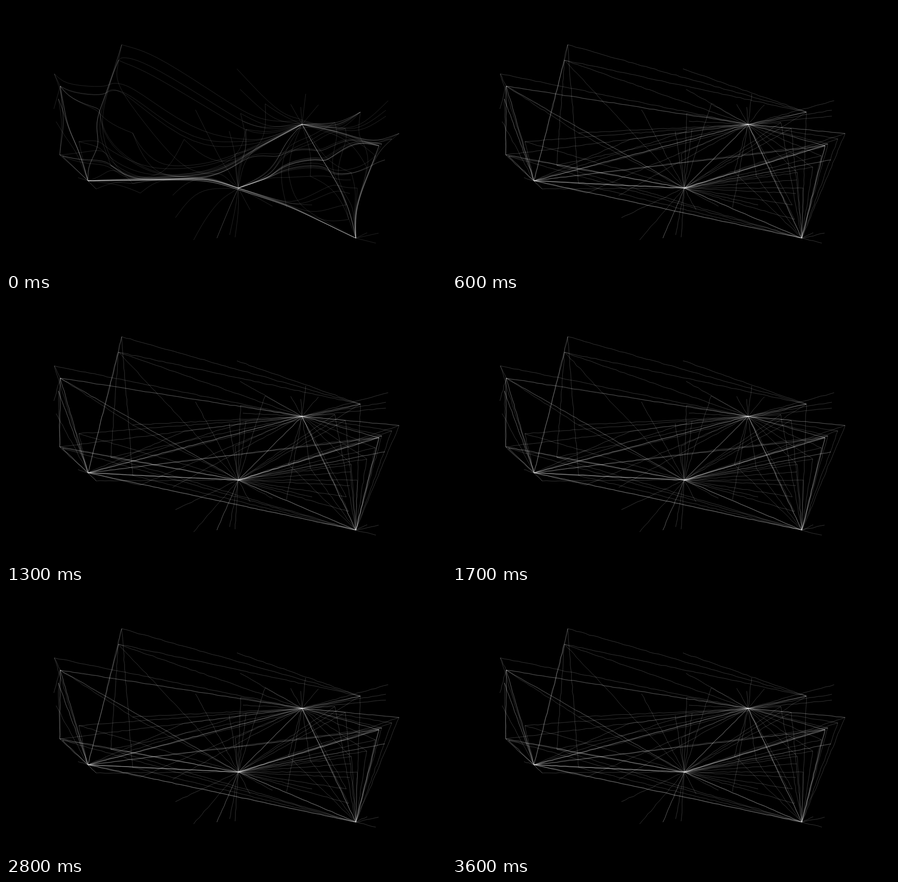
Recreate the animation shown at these times as an HTML page with a canvas. Size 966x580 px, loop 3.7 s.

```html
<!DOCTYPE html>
<html lang="en">
<head>
<meta charset="utf-8">
<title>Edge bundling</title>
<style>
  html, body { margin: 0; width: 100%; height: 100%; overflow: hidden; background: #000; }
  canvas { display: block; }
</style>
</head>
<body>
<canvas id="stage" width="966" height="580"></canvas>
<script>
const ctx = document.getElementById('stage').getContext('2d');
const STEP = 100, STEPS = 37, SPACING = 10;

const hubs = {
  C: [650, 260], D: [510, 400], M: [768, 510], L: [180, 384], T: [778, 233],
  B: [119, 176], F: [118, 327], P: [247, 119], S: [254, 85], R: [819, 307]
};
const hubLinks = ('CD CD CD CM CM CM CL CL CL DM DM DM DL DL DL DL LM LM LM CT CT DT MT LT ' +
  'BC BC BD BD BL BL BF BF FC FD FD FL PC PD PT PL PL ST SL SP ' +
  'RC RC RD RD RD RM RM RM RL RL').split(' ');

// Outer places, each with the hubs it links to.
const places = [
  [106, 149, 'CLB'], [115, 204, 'LLF'], [105, 226, 'B'], [124, 330, 'LLDM'],
  [198, 402, 'LFD'], [230, 350, 'PDMC'], [278, 390, 'SDLM'], [278, 279, 'CBD'],
  [160, 298, 'CDL'], [110, 254, 'L'], [158, 377, 'L'],
  [295, 411, 'LC'], [366, 416, 'C'], [391, 293, 'CL'], [416, 228, 'D'],
  [490, 275, 'D'], [515, 236, 'DC'], [527, 271, 'CDL'], [514, 183, 'C'],
  [507, 138, 'T'], [569, 215, 'CD'], [503, 325, 'DC'], [520, 253, 'C'],
  [372, 465, 'D'], [412, 514, 'D'], [463, 510, 'DD'], [491, 503, 'D'],
  [503, 508, 'D'], [536, 448, 'D'], [585, 440, 'D'], [616, 443, 'C'],
  [672, 437, 'D'], [668, 374, 'CM'], [620, 365, 'CM'],
  [658, 193, 'C'], [625, 216, 'C'], [647, 222, 'C'], [686, 217, 'C'],
  [839, 208, 'C'], [834, 229, 'C'], [834, 242, 'C'],
  [863, 280, 'CCDM'], [847, 292, 'CDM'], [825, 303, 'CDDML'], [832, 338, 'DD'],
  [792, 354, 'CDM'], [811, 329, 'CDM'], [745, 269, 'CDM'], [722, 256, 'CDM'],
  [758, 366, 'CDM'], [757, 382, 'D'], [771, 400, 'DM'], [755, 412, 'D'],
  [747, 437, 'CD'], [752, 469, 'CD'],
  [818, 499, 'M'], [812, 521, 'M'], [793, 498, 'M']
];

// Trunks that bundled edges are drawn towards.
const { C, D, M, L, B, F, S, R } = hubs;
const joint = [450, 378], fork = [760, 465];
const trunks = [
  [L, [300, 382], joint, D, [590, 372], [612, 300], C, [720, 273], [790, 298], R],
  [joint, [500, 355], [550, 315], C],
  [C, [690, 330], [735, 400], fork, M],
  [fork, [775, 415], R],
  [B, [134, 267], [160, 315], L],
  [F, [124, 290], [134, 267]],
  [F, [160, 360], L],
  [S, [215, 205], [190, 262], [230, 350]],
  [D, [620, 437], M]
];

const clamp = v => Math.max(0, Math.min(1, v));
const mix = (a, b, k) => [a[0] + (b[0] - a[0]) * k, a[1] + (b[1] - a[1]) * k];
const dist = (a, b) => Math.hypot(a[0] - b[0], a[1] - b[1]);

function noise(a, b, c) {
  const v = Math.sin(a * 12.9898 + b * 78.233 + c * 37.719) * 43758.5453;
  return v - Math.floor(v) - 0.5;
}

function nearestOnTrunks(p) {
  let best = p, shortest = Infinity;
  for (const trunk of trunks) {
    for (let i = 1; i < trunk.length; i++) {
      const [a, b] = [trunk[i - 1], trunk[i]];
      const dx = b[0] - a[0], dy = b[1] - a[1];
      const k = clamp(((p[0] - a[0]) * dx + (p[1] - a[1]) * dy) / (dx * dx + dy * dy));
      const q = mix(a, b, k), d = dist(p, q);
      if (d < shortest) { shortest = d; best = q; }
    }
  }
  return [best, shortest];
}

function smooth(points) {
  return points.map((p, i) => i && i < points.length - 1
    ? mix(p, mix(points[i - 1], points[i + 1], 0.5), 0.6) : p);
}

function bundle(line, length, id) {
  const strength = (0.55 + 0.14 * noise(id, 3, 7)) * clamp((length - 60) / 180);
  let points = line;
  for (let pass = 0; pass < 4; pass++) {
    points = points.map((p, i) => {
      const taper = clamp(Math.min(i, points.length - 1 - i) * SPACING / 50);
      const [q, d] = nearestOnTrunks(p);
      return mix(p, q, strength * taper * Math.exp(-d / 130));
    });
    for (let i = 0; i < 6; i++) points = smooth(points);
  }
  return points;
}

function makeEdge([a, b], id) {
  const length = dist(a, b), n = Math.max(4, Math.ceil(length / SPACING));
  const line = Array.from({ length: n + 1 }, (_, i) => mix(a, b, i / n));
  return { line, bundled: bundle(line, length, id) };
}

const links = hubLinks.map(([a, b]) => [hubs[a], hubs[b]]);
for (const [x, y, targets] of places) {
  for (const name of targets) links.push([[x, y], hubs[name]]);
}
const edges = links.map(makeEdge);

function draw(step) {
  const pull = 0.3 ** step;
  const wobble = 1.7 * (1 - pull);
  ctx.fillStyle = '#000';
  ctx.fillRect(0, 0, 966, 580);
  ctx.lineWidth = 1;
  ctx.strokeStyle = `rgba(255,255,255,${0.22 - 0.07 * pull})`;
  edges.forEach(({ line, bundled }, id) => {
    ctx.beginPath();
    line.forEach((p, i) => {
      const [x, y] = mix(p, bundled[i], pull);
      const shake = i && i < line.length - 1 ? wobble : 0;
      ctx.lineTo(x + shake * noise(id, i, step), y + shake * noise(i, id + 400, step));
    });
    ctx.stroke();
  });
}

let shown = -1;
const start = performance.now();
function tick(now) {
  const step = Math.floor(Math.max(0, now - start) / STEP) % STEPS;
  if (step !== shown) draw(shown = step);
  requestAnimationFrame(tick);
}
draw(shown = 0);
requestAnimationFrame(tick);
</script>
</body>
</html>
```
